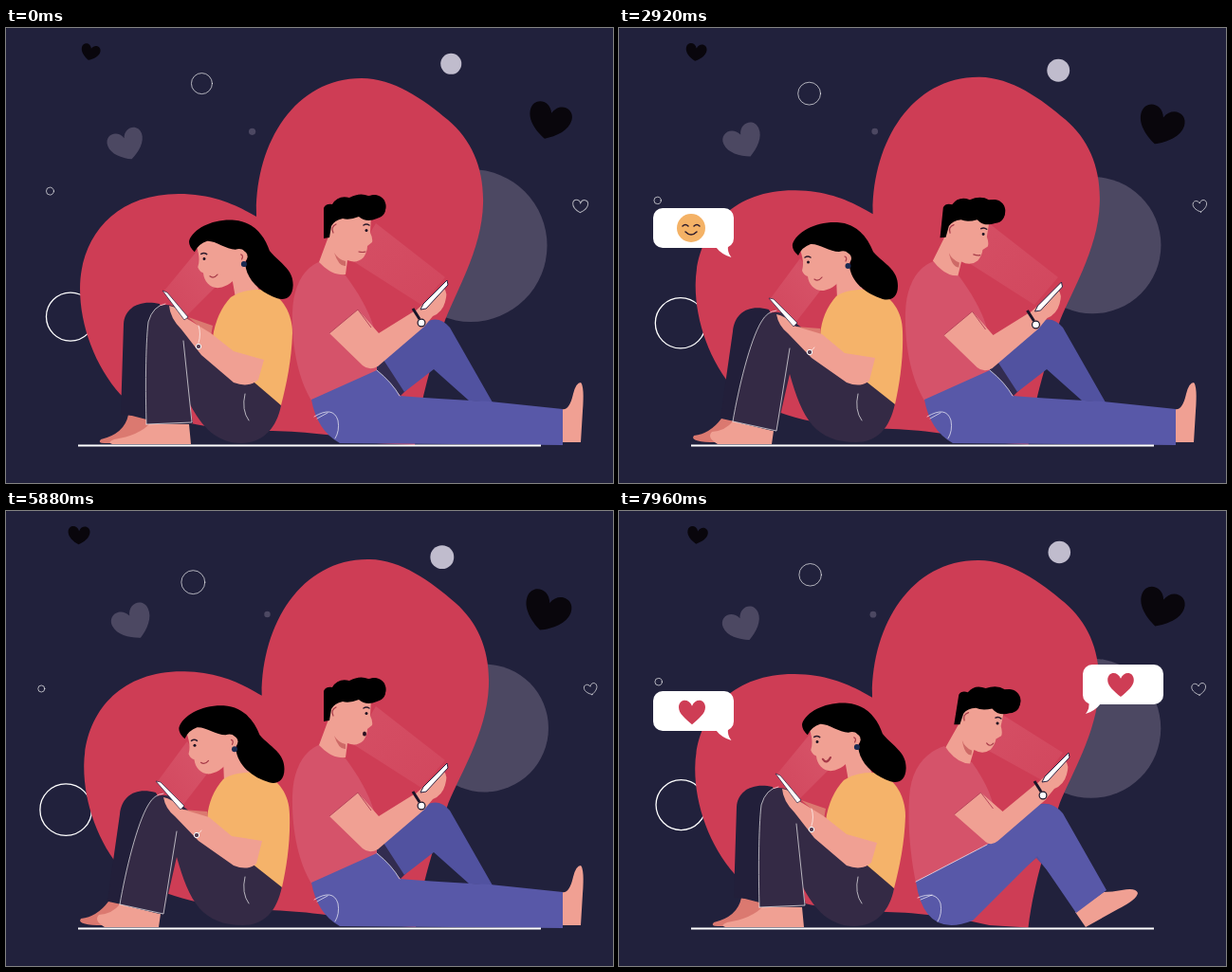
An HTML page for the animation above (8 s loop, 640 by 480 pixels).

```html
<!DOCTYPE html>
<html lang="en">
<head>
<meta charset="utf-8">
<title>Messages</title>
<style>
html, body { margin: 0; width: 100%; height: 100%; overflow: hidden; background: #21213c; }
svg { display: block; width: 100vw; height: 100vh; }
.skin { fill: #f0a093; }
.dark-skin { fill: #db7970; }
.jeans { fill: #5858a8; }
.far-jeans { fill: #5152a0; }
.pants { fill: #342a45; }
.red { fill: #ce3d55; }
.shirt { fill: #d5536a; }
.line { fill: none; stroke: #fff; stroke-width: 1; vector-effect: non-scaling-stroke; stroke-linecap: round; }
.faint { stroke-opacity: .65; }
.ink { fill: none; stroke: #2b1a2c; stroke-width: 1.5; stroke-linecap: round; }
.face-ink { fill: none; stroke: #a63a48; stroke-width: 1.2; stroke-linecap: round; }
</style>
</head>
<body>
<svg viewBox="0 0 640 480">
  <defs>
    <path id="heart" d="M0,.95C-.5,.5 -1,.15 -1,-.35C-1,-.98 -.25,-1.08 0,-.45C.25,-1.08 1,-.98 1,-.35C1,.15 .5,.5 0,.95Z"/>
    <path id="wideHeart" d="M0,.86C-.5,.62 -1,.2 -1,-.3C-1,-.9 -.22,-1 0,-.38C.22,-1 1,-.9 1,-.3C1,.2 .5,.62 0,.86Z"/>
    <rect id="cloud" x="-42.500" y="-21" width="85" height="42" rx="10" fill="#fff"/>
    <linearGradient id="glowLeft" x1="0" y1="1" x2="1" y2="0">
      <stop offset="0" stop-color="#f3a0aa" stop-opacity=".1"/>
      <stop offset=".7" stop-color="#f3a0aa" stop-opacity=".2"/>
      <stop offset="1" stop-color="#f3a0aa" stop-opacity=".1"/>
    </linearGradient>
    <linearGradient id="glowRight" x1="1" y1="1" x2="0" y2="0">
      <stop offset="0" stop-color="#f3a0aa" stop-opacity=".1"/>
      <stop offset="1" stop-color="#f3a0aa" stop-opacity=".18"/>
    </linearGradient>
  </defs>
  <rect width="640" height="480" fill="#21213c"/>

  <!-- drifting decor -->
  <g id="decor">
    <circle r="1" fill="#4c4862" data-k="drift" data-attr="transform" data-a="translate(490,229.5) scale(80.500)" data-b="translate(505,229) scale(67)"/>
    <circle r="1" class="line" style="stroke-width:1.3" data-k="drift" data-attr="transform" data-a="translate(68,304.500) scale(25.500)" data-b="translate(63,315.500) scale(27.300)"/>
    <circle r="1" class="line faint" data-k="drift" data-attr="transform" data-a="translate(206.500,58.500) scale(11)" data-b="translate(197,75.700) scale(12.500)"/>
    <circle r="1" class="line faint" data-k="drift" data-attr="transform" data-a="translate(46.500,172) scale(4)" data-b="translate(37,188) scale(3.500)"/>
    <circle r="1" fill="#c0bccd" data-k="drift" data-attr="transform" data-a="translate(469.300,37.800) scale(11)" data-b="translate(459.500,49) scale(12.500)"/>
    <circle r="1" fill="#4c4862" data-k="drift" data-attr="transform" data-a="translate(259.500,109.300) scale(3.600)" data-b="translate(276,109) scale(3.200)"/>
    <use href="#wideHeart" fill="#4c4862" data-k="drift" data-attr="transform" data-a="translate(127,123) rotate(-20) scale(19)" data-b="translate(134,117.500) rotate(-27) scale(21)"/>
    <use href="#wideHeart" fill="#09060c" data-k="drift" data-attr="transform" data-a="translate(573,98) rotate(15) scale(22.500)" data-b="translate(570,106) rotate(20) scale(24.500)"/>
    <use href="#wideHeart" fill="#09060c" data-k="drift" data-attr="transform" data-a="translate(89,25.500) rotate(15) scale(10)" data-b="translate(76.500,25.500) rotate(2) scale(11.500)"/>
    <use href="#wideHeart" fill="#0d0a14" data-k="drift" data-attr="transform" data-a="translate(601,309) rotate(10) scale(4)" data-b="translate(585,318) scale(2.800)"/>
    <path class="line faint" d="M0,.86C-.5,.62 -1,.2 -1,-.3C-1,-.9 -.22,-1 0,-.38C.22,-1 1,-.9 1,-.3C1,.2 .5,.62 0,.86Z" data-k="drift" data-attr="transform" data-a="translate(605.500,187.800) rotate(3) scale(8)" data-b="translate(617,187.800) rotate(-14) scale(6.800)"/>
  </g>
  <path class="red" data-k="drift" data-attr="transform" data-a="translate(0,0) rotate(0,480,440)" data-b="translate(1,0) rotate(1.150,480,440)"
    d="M264,199C262,124 303,53 375,53C408,53 440,75 466,97C491,118 504,148 503,185C502,232 476,275 463,308C450,350 437,390 431,440L390,438C340,427 300,425 270,425C215,424 165,415 121,387C94,357 78,314 78,275C78,222 113,175 182,175C220,175 245,188 264,199Z"/>

  <!-- woman -->
  <path fill="url(#glowLeft)" data-k="woman" data-a="M167,277L204,232L222,272L190,304Z" data-b="M160,285L191,243L213,276L186,311Z"/>
  <path class="dark-skin" data-k="woman"
    data-a="M129,408L152,414L150,438H104Q96,438 100,434Q125,428 129,408Z"
    data-b="M108,412L126,416L124,437H96Q74,436 79,430Q96,428 108,412Z"/>
  <path fill="#221f3a" data-k="woman"
    data-a="M121,408L124,312C125,296 140,286 162,291L175,330L152,410Z"
    data-b="M107,411L120,320C122,300 137,291 158,297L175,330L150,415Z"/>
  <path class="skin" data-k="woman"
    data-a="M152,417L193,418L195,439H112Q106,437 114,434Q140,430 152,417Z"
    data-b="M120,415L163,425L161,439H104Q92,432 98,426Q112,425 120,415Z"/>
  <path class="pants" data-k="woman"
    data-a="M290,398C285,425 268,438 248,438C222,438 206,420 194,397L197,417L148,418C147,385 147,335 150,310C155,293 166,289 178,294L262,372Z"
    data-b="M291,396C285,425 270,437 250,437C207,437 193,412 180,365L166,426L120,415C126,380 138,330 150,310C156,299 166,298 175,302L262,372Z"/>
  <path class="line faint" data-k="woman"
    data-a="M148,418C147,385 147,335 150,310Q155,293 168,291M187,330L196,416L148,418"
    data-b="M120,415C126,380 138,330 150,310Q156,299 166,298M180,338L166,425L120,415"/>
  <path class="line faint" d="M252,386Q248,403 256,414"/>

  <path class="skin" data-k="woman"
    data-a="M238,262L242,285L270,282L252,250Z" data-b="M229,262L230,286L262,284L243,250Z"/>
  <path fill="#f5b36a" data-k="woman"
    data-a="M237,284C246,278 262,274 274,277C292,283 302,302 302,322C301,350 296,375 290,398L236,352L218,326Q222,300 237,284Z"
    data-b="M229,283C238,277 256,274 268,277C288,282 299,300 299,320C300,348 296,375 291,397L234,352L212,324Q214,300 229,283Z"/>
  <g data-k="woman" data-attr="transform" data-a="translate(8,-1) rotate(2,270,290)" data-b="translate(0,0) rotate(0,270,290)">
    <g id="womanHead">
      <path class="skin" d="M191,234C194,243 195,249 193,256Q195,261 199,262C200,271 207,278 216,277C225,275 231,270 238,260L246,240L230,218L205,222Z"/>
      <path d="M183,228C187,215 208,204 230,205C250,206 262,220 268,236C278,248 294,254 294,272C294,285 286,288 278,286C262,281 246,270 243,252C246,238 240,233 232,236C222,236 210,227 202,228Q193,231 189,240Q182,234 183,228Z"/>
      <circle class="skin" cx="239" cy="243" r="6"/>
      <path class="face-ink" d="M238,241q3,1 1,5"/>
      <circle cx="241.500" cy="251" r="3" fill="#1b2b52"/>
      <circle cx="199.500" cy="247" r="1.500" fill="#1b1020"/>
      <path class="ink" id="womanBrow"/>
      <path class="face-ink" id="womanMouth"/>
    </g>
  </g>
  <path class="dark-skin" data-k="woman" data-a="M192,305L218,314L216,325Z" data-b="M186,315L212,317L213,326Z"/>
  <path class="skin" data-k="woman"
    data-a="M172,293Q182,294 190,306L216,322L240,341L272,350L266,371Q256,380 240,374L206,345L185,318Q173,306 172,293Z"
    data-b="M166,302Q175,303 184,314L214,323L238,343L270,348L264,372Q255,380 240,374L203,348L178,322Q168,314 166,302Z"/>
  <path fill="#fff" stroke="#2b2240" stroke-width=".7" data-k="woman"
    data-a="M165,277L170,279L192,305L188,308Z" data-b="M158,285L163,286L188,311L184,315Z"/>
  <path class="line faint" data-k="woman" data-a="M203,314Q206,323 203,332" data-b="M206,337Q205,339 203,340"/>
  <circle r="2.700" fill="#5b4356" stroke="#fff" data-k="woman" data-attr="transform" data-a="translate(203,336)" data-b="translate(201,342)"/>

  <!-- man -->
  <path fill="url(#glowRight)" data-k="sit" data-a="M390,206L463,263L438,292L366,246Z" data-b="M406,216L468,255L446,284L388,252Z"/>
  <path fill="#322c50" data-k="sit" data-a="M386,360L399,349L426,378L416,388Z" data-b="M386,355L399,346L426,345L400,365Z"/>
  <path class="far-jeans" data-k="sit"
    data-a="M398,350L436,314Q455,300 468,316L513,395L488,393L451,360L420,384Z"
    data-b="M390,352L434,314Q452,302 466,318L510,398L486,418L440,366L400,400Z"/>
  <path class="skin" data-k="sit"
    data-a="M586,402Q594,404 598,386Q601,374 606,374Q610,378 608,404L606,437L586,437Z"
    data-b="M511,402Q520,402 530,400Q545,397 547,403Q546,410 526,420L492,439L481,423Z"/>
  <path class="shirt" data-k="sit"
    data-a="M332,246C315,252 303,270 302,300C301,335 308,370 322,393L391,362L391,330C388,310 378,288 358,261Q344,260 332,246Z"
    data-b="M343,248C322,255 308,272 306,302C304,335 308,368 313,392L388,354L396,330C398,312 390,290 372,265Q356,262 343,248Z"/>
  <path class="jeans" data-k="sit"
    data-a="M322,392L391,361Q407,374 415,388Q450,391 510,394L587,402L587,440L470,439L352,438Q328,425 322,392Z"
    data-b="M313,391L388,352Q414,332 436,313Q455,303 468,319L514,400L482,424L441,364L373,432Q322,452 313,391Z"/>
  <path class="line faint" data-k="sit"
    data-a="M325,410Q345,398 350,414Q352,425 347,433M328,412L339,406M391,361Q407,374 415,388L510,394"
    data-b="M315,408Q334,400 339,414Q341,425 336,433M318,410L330,405M313,391L388,352L388,352"/>

  <g data-k="sit" data-attr="transform" data-a="translate(0,0) rotate(0,345,255)" data-b="translate(13,4.500) rotate(3,345,255)">
    <g data-k="lean" data-attr="transform" data-a="rotate(0,345,255)" data-b="rotate(6,345,255)">
      <path class="skin" d="M342,206L340,220L330,247Q344,262 358,260L360,245Q370,249 377,242Q381,236 381,230L386,226Q387,222 384,216L385,196L350,192Z"/>
      <path d="M335,222L335,190Q337,185 344,186Q350,176 362,179Q373,173 382,177Q396,174 400,186Q402,198 391,201Q380,206 372,199Q362,203 355,201Q346,203 343,209L341,221Z"/>
      <circle cx="388.500" cy="188" r="12"/>
      <path class="face-ink" d="M348,207q-6,3 -3,9"/>
      <path d="M358,246Q350,244 346,237Q351,252 358,251Z" fill="#ce6a67"/>
      <circle cx="380" cy="213.500" r="1.500" fill="#1b1020"/>
      <path class="ink" d="M377,208q3,-2 6,0" stroke-width="1"/>
      <path class="face-ink" id="manMouth"/>
      <ellipse id="manGasp" cx="378" cy="235" rx="2" ry="2.600" fill="#2b1020"/>
    </g>
  </g>

  <g data-k="lean" data-attr="transform" data-a="translate(0,0)" data-b="translate(1.500,2)">
    <g data-k="sit" data-attr="transform" data-a="translate(0,0)" data-b="translate(7.500,-13)">
      <path class="skin" d="M430,300L440,291L462,275Q466,279 463,289Q460,300 450,304L441,315Z"/>
    </g>
    <path class="skin" data-k="sit"
      data-a="M341,322L371,297L393,322L430,299L441,315L392,357Q383,362 376,356Z"
      data-b="M352,318L380,295L403,315L438,286L449,302L398,346Q391,352 385,347Z"/>
    <path fill="none" stroke="#b9465c" data-k="sit" data-a="M341,322L371,297L385,316" data-b="M352,318L380,295L393,312"/>
    <g data-k="sit" data-attr="transform" data-a="translate(0,0)" data-b="translate(7.500,-13)">
      <path d="M437,297L440,291L465,266L466,271L443,296Z" fill="#fff" stroke="#2b2240" stroke-width="1"/>
      <path d="M429,296L436,307" stroke="#191428" stroke-width="3"/>
      <circle cx="438" cy="311" r="3.900" fill="#fff" stroke="#191428" stroke-width="1.200"/>
    </g>
  </g>
  <path d="M76,440.500H564" stroke="#fff" stroke-width="2"/>

  <!-- speech bubbles; each is scaled from its tail tip -->
  <g id="rightBubble">
    <use href="#cloud" x="531.500" y="183"/>
    <path d="M495,200Q497,208 492,214Q502,211 508,203Z" fill="#fff"/>
    <g id="kiss">
      <circle cx="529" cy="183.500" r="14.500" fill="#f4b266"/>
      <path class="ink" d="M520,181q3,-3 6,0M533,181q3,-3 6,0M528,184q4,0 1,3q4,1 0,4" style="stroke-width:1.2"/>
      <use href="#heart" class="red" transform="translate(522,188) scale(3.500)"/>
    </g>
    <use id="loveRight" href="#heart" class="red" transform="translate(529,183) scale(13.800)"/>
  </g>
  <g id="leftBubble">
    <use href="#cloud" x="78.500" y="211"/>
    <path d="M102,231Q108,239 118.500,242Q114,237 115,229Z" fill="#fff"/>
    <g id="smile">
      <circle cx="76" cy="211" r="15" fill="#f4b266"/>
      <path class="ink" d="M67,209q3,-3 6,0M79,209q3,-3 6,0M70,215q6,6 12,0"/>
    </g>
    <g id="angry">
      <circle cx="75.500" cy="212" r="14" fill="#d0405a"/>
      <path class="ink" d="M67,206l5,3M84,206l-5,3M70,219q5.500,-5 11,0M71,211v1M80,211v1"/>
    </g>
    <use id="loveLeft" href="#heart" class="red" transform="translate(77,212) scale(14)"/>
  </g>
</svg>
<script>
const LOOP = 8000;
const $ = id => document.getElementById(id);
const clamp = x => Math.min(1, Math.max(0, x));
const smooth = x => x * x * (3 - 2 * x);
const ramp = (t, from, to) => smooth(clamp((t - from) / (to - from)));
const between = (t, from, to) => t >= from && t < to;
const show = (id, on) => { $(id).style.display = on ? '' : 'none'; };

// Blends every number of two strings that share one structure.
const NUMBER = /-?\d*\.?\d+/g;
const parts = [...document.querySelectorAll('[data-k]')].map(el => ({
  el,
  key: el.dataset.k,
  attr: el.dataset.attr || 'd',
  from: el.dataset.a,
  to: el.dataset.b.match(NUMBER).map(Number)
}));
const blend = (from, to, k) => {
  let i = 0;
  return from.replace(NUMBER, n => (+n + (to[i++] - n) * k).toFixed(3));
};

const pop = (t, start, end) => {
  const grow = clamp((t - start) / 280) - 1;
  const inScale = t < start ? 0 : 1 + 2.2 * grow ** 3 + 1.2 * grow ** 2;
  return inScale * (1 - ramp(t, end, end + 200));
};

const setBubble = (id, x, y, scale) => {
  show(id, scale > 0.01);
  $(id).setAttribute('transform', `translate(${x},${y}) scale(${scale}) translate(${-x},${-y})`);
};

function draw(t) {
  const pose = {
    drift: 0.5 + 0.5 * Math.cos(Math.PI * (t - 5250) / 5500),
    woman: ramp(t, 200, 900) - ramp(t, 6900, 7500),
    lean: ramp(t, 300, 900) - ramp(t, 4100, 4600) + ramp(t, 6300, 6900),
    sit: ramp(t, 6900, 7500)
  };
  for (const { el, key, attr, from, to } of parts) el.setAttribute(attr, blend(from, to, pose[key]));

  const upset = ramp(t, 3350, 3600) - ramp(t, 5700, 6000);
  $('womanHead').setAttribute('transform', `translate(${-1.5 * upset},${upset})`);
  $('womanBrow').setAttribute('d', upset > 0.5 ? 'M195,241L202,244' : 'M196,242q3,-2 6,0');
  const joy = ramp(t, 7200, 7500);
  $('womanMouth').setAttribute('d', upset > 0.5 ? 'M206,267q3,-2 6,0' : `M206,265q4,${3 + 3 * joy} 8,-2`);
  $('womanMouth').style.strokeWidth = 1.2 + joy;

  const gasp = between(t, 4450, 6850);
  show('manGasp', gasp);
  show('manMouth', !gasp);
  $('manMouth').setAttribute('d', `M372,236q4,${1 + 3 * joy} 7,${-joy}`);

  const love = t > 7000;
  setBubble('rightBubble', 492, 214, Math.max(pop(t, 800, 2050), pop(t, 7400, 9000)));
  setBubble('leftBubble', 118, 242, Math.max(pop(t, 2150, 3250), pop(t, 4050, 5500), pop(t, 7400, 9000)));
  show('kiss', !love);
  show('loveRight', love);
  show('smile', t < 3800);
  show('angry', between(t, 3800, 7000));
  show('loveLeft', love);
}

const begin = performance.now();
function tick() {
  draw((performance.now() - begin) % LOOP);
  requestAnimationFrame(tick);
}
tick();
</script>
</body>
</html>
```
